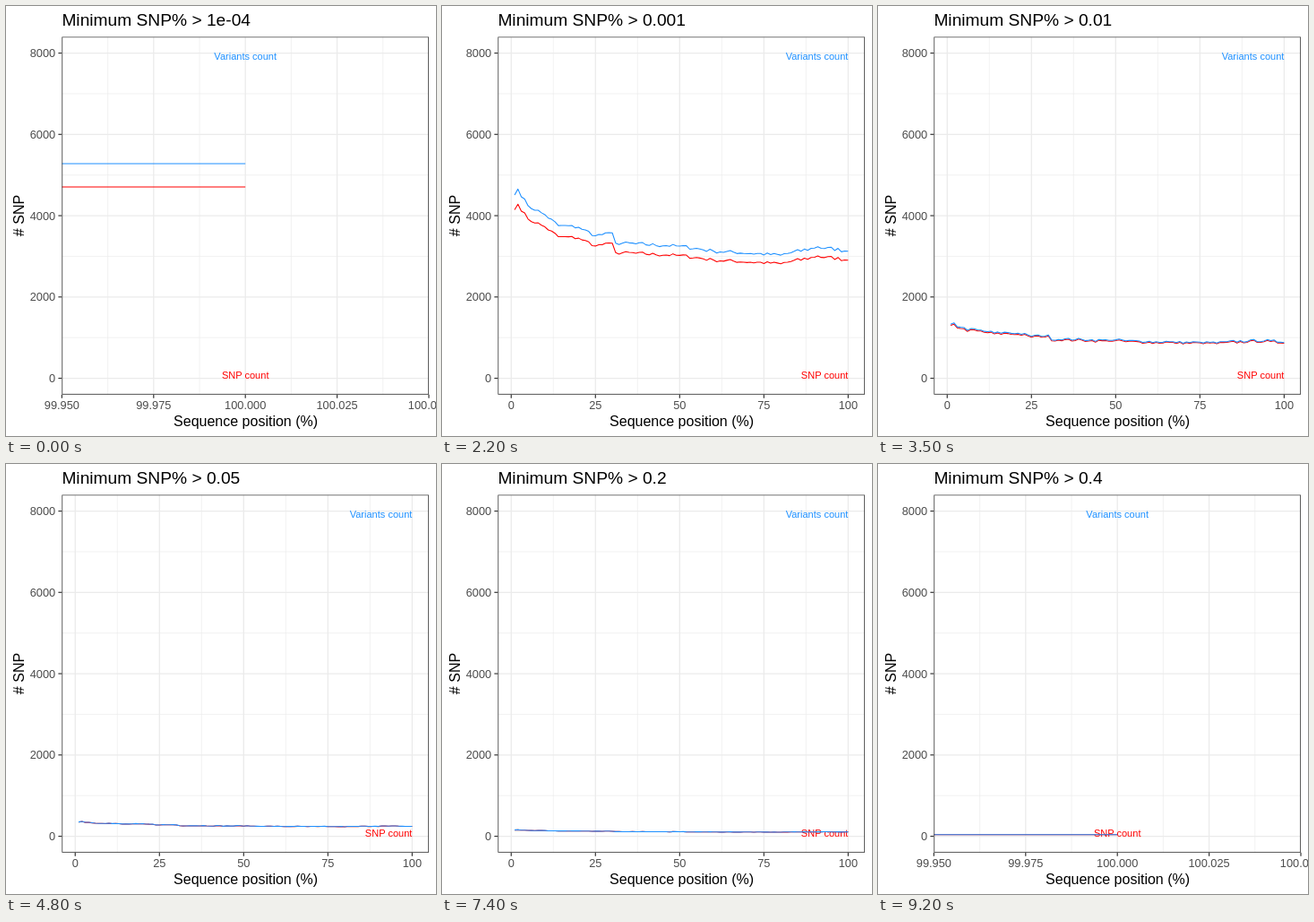
These frames come from a looping animation (480 px wide and 480 px high, 10 s). An HTML page:

```html
<!DOCTYPE html>
<html lang="en">
<head>
<meta charset="utf-8">
<title>SNP counts</title>
<style>
  html, body { margin: 0; width: 100%; height: 100%; overflow: hidden; background: #fff; }
  svg { display: block; width: 100%; height: 100%; font-family: "Liberation Sans", Arial, sans-serif; }
  .axis { font-size: 12.8px; fill: #4d4d4d; }
  .name { font-size: 16px; text-anchor: middle; }
  .label { font-size: 11.04px; }
  .major { stroke: #ebebeb; stroke-width: 1.3; }
  .minor { stroke: #ebebeb; stroke-width: .65; }
  .tick { stroke: #333; stroke-width: 1.2; }
  .border { fill: none; stroke: #333; stroke-width: 1.55; }
  .series { fill: none; stroke-width: 1.07; stroke-linejoin: round; }
</style>
</head>
<body>
<svg id="chart" viewBox="0 0 480 480"></svg>
<script>
const svg = document.getElementById("chart");
const panel = { left: 62.4, right: 472, top: 34.4, bottom: 433.7 };
const BLUE = "#1e90ff", RED = "#ff0000";
const STEPS = 6;

const lerp = (a, b, p) => a + (b - a) * p;
const yOf = v => lerp(panel.bottom, panel.top, (v + 400) / 8800);

let seed = 7;
const noise = () => (seed = (seed * 16807) % 2147483647) / 2147483647 * 2 - 1;

// Key points of the curve along the sequence; the gaps are filled with small noise.
const keys = [[1, 4500], [2, 4650], [5, 4240], [10, 4020], [14, 3750], [20, 3710],
  [25, 3500], [30, 3570], [31, 3330], [50, 3250], [60, 3130], [80, 3030], [91, 3230], [100, 3130]];

function profileAt(x) {
  const next = Math.max(1, keys.findIndex(k => k[0] >= x));
  const [x0, y0] = keys[next - 1], [x1, y1] = keys[next];
  const p = (x - x0) / (x1 - x0);
  return lerp(y0, y1, p) + (p > 0 && p < 1 ? 45 * noise() : 0);
}
const profile = Array.from({ length: 100 }, (_, i) => profileAt(i + 1));

// Rarer thresholds get a rougher curve, slightly raised around a fifth of the way.
function makeState(title, scale) {
  const rough = scale < 1 ? .03 : 0;
  const variants = profile.map((v, i) =>
    v * scale * (1 + rough * (noise() + 1.5 * Math.exp(-(((i - 19) / 9) ** 2)))));
  const snps = variants.map((v, i) => v * (1 - .0645 * scale * (1 + .15 * Math.exp(-i / 10))));
  return { title, variants, snps };
}
const states = [
  makeState("1e-04", 1.687),
  makeState("0.001", 1.134),
  makeState("0.01", .329),
  makeState("0.05", .0833),
  makeState("0.1", .0515),
  makeState("0.2", .0364),
  makeState("0.3", .022),
  makeState("0.4", .0125)
];

function add(parent, tag, attrs, text) {
  const node = document.createElementNS("http://www.w3.org/2000/svg", tag);
  for (const key in attrs) node.setAttribute(key, attrs[key]);
  if (text !== undefined) node.textContent = text;
  parent.append(node);
  return node;
}
const line = (parent, cls, x1, y1, x2, y2) => add(parent, "line", { class: cls, x1, y1, x2, y2 });

const clip = add(add(svg, "defs", {}), "clipPath", { id: "inside" });
const box = {
  x: panel.left, y: panel.top,
  width: panel.right - panel.left, height: panel.bottom - panel.top
};
add(clip, "rect", box);

const axes = add(svg, "g", {});
const plot = add(svg, "g", { "clip-path": "url(#inside)" });

for (let v = 1000; v < 8000; v += 2000) line(plot, "minor", panel.left, yOf(v), panel.right, yOf(v));

function makeView(min, max, first, step, digits) {
  const xOf = v => lerp(panel.left, panel.right, (v - min) / (max - min));
  const grid = add(plot, "g", {});
  const ticks = add(axes, "g", {});
  for (let i = 0; i < 4; i++) {
    const x = xOf(first + (i + .5) * step);
    line(grid, "minor", x, panel.top, x, panel.bottom);
  }
  for (let i = 0; i < 5; i++) {
    const value = first + i * step, x = xOf(value);
    line(grid, "major", x, panel.top, x, panel.bottom);
    line(ticks, "tick", x, panel.bottom, x, panel.bottom + 4);
    add(ticks, "text", { class: "axis", x, y: 450.2, "text-anchor": "middle" }, value.toFixed(digits));
  }
  return { xOf, parts: [grid, ticks] };
}
const wide = makeView(-3.95, 104.95, 0, 25, 0);
const narrow = makeView(99.95, 100.05, 99.95, .025, 3);

for (let v = 0; v <= 8000; v += 2000) {
  line(plot, "major", panel.left, yOf(v), panel.right, yOf(v));
  line(axes, "tick", panel.left - 4, yOf(v), panel.left, yOf(v));
  add(axes, "text", { class: "axis", x: 55.2, y: yOf(v) + 4.6, "text-anchor": "end" }, v);
}

const snpLine = add(plot, "path", { class: "series", stroke: RED });
const snpLabel = add(plot, "text", { class: "label", fill: RED, y: yOf(0) }, "SNP count");
const variantLine = add(plot, "path", { class: "series", stroke: BLUE });
const variantLabel = add(plot, "text", { class: "label", fill: BLUE, y: 60.3 }, "Variants count");
add(plot, "rect", { ...box, class: "border" });

const title = add(svg, "text", { x: 62.4, y: 22, "font-size": 19.2 });
add(svg, "text", { class: "name", x: 267.6, y: 469 }, "Sequence position (%)");
add(svg, "text", { class: "name", transform: "translate(20 234) rotate(-90)" }, "# SNP");

// Changes come every 1.3 s; the first pause after one is a step longer.
const starts = states.slice(1).map((_, i) => 8 + 13 * i + (i > 0));

function draw(ms) {
  const tick = Math.floor(ms / 100) % 100;
  const index = starts.filter(s => s <= tick).length;
  const step = index ? tick - starts[index - 1] + 1 : STEPS;
  const moving = step < STEPS;
  const to = states[index];
  const from = moving ? states[index - 1] : to;
  const p = moving ? step / STEPS : 1;
  const view = moving ? wide : narrow;

  for (const part of wide.parts) part.style.display = moving ? "" : "none";
  for (const part of narrow.parts) part.style.display = moving ? "none" : "";

  const path = key => "M" + to[key].map((v, i) =>
    view.xOf(i + 1).toFixed(2) + " " + yOf(lerp(from[key][i], v, p)).toFixed(2)).join("L");
  snpLine.setAttribute("d", path("snps"));
  variantLine.setAttribute("d", path("variants"));

  for (const label of [snpLabel, variantLabel]) {
    label.setAttribute("x", view.xOf(100));
    label.setAttribute("text-anchor", moving ? "end" : "middle");
  }
  title.textContent = "Minimum SNP% > " + (p > .5 ? to : from).title;
}

const begin = performance.now();
function loop() {
  draw((performance.now() - begin) % 10000);
  requestAnimationFrame(loop);
}
draw(0);
requestAnimationFrame(loop);
</script>
</body>
</html>
```
